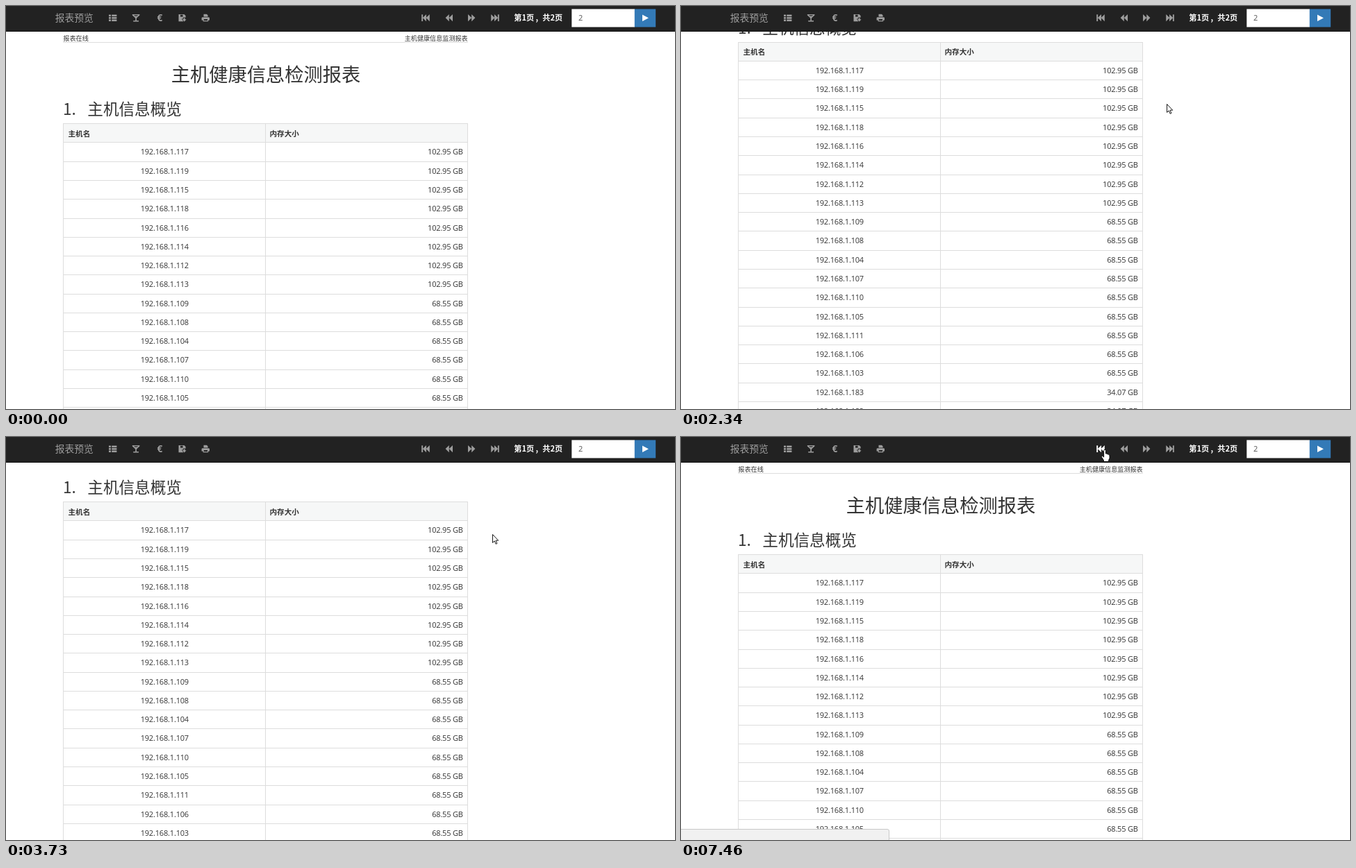
Write an HTML page that moves like this. It is 963x581 px and loops after 8 s.

```html
<!DOCTYPE html>
<html lang="zh-CN">
<head>
<meta charset="utf-8">
<title>报表预览</title>
<style>
html, body { margin: 0; width: 100%; height: 100%; overflow: hidden; background: #fff; }
svg { display: block; width: 963px; height: 581px; }
text { font-family: "Open Sans", "Noto Sans CJK SC", "Noto Sans CJK", sans-serif; fill: #333; }
.cjk { font-family: "Noto Sans CJK SC", "Noto Sans CJK", sans-serif; }
.cell { font-size: 11px; letter-spacing: -.18px; }
.icon { fill: #9d9d9d; }
.pages { font-weight: 700; fill: #fff; }
</style>
</head>
<body>
<svg id="stage" viewBox="0 0 963 581"></svg>
<script>
const stage = document.getElementById("stage");
const LOOP = 8000, TICK = 76, TOP = 169.6, PITCH = 27.28;

function add(parent, tag, attrs, content) {
  const el = document.createElementNS("http://www.w3.org/2000/svg", tag);
  for (const k in attrs) el.setAttribute(k, attrs[k]);
  if (content) el.textContent = content;
  return parent.appendChild(el);
}
const rect = (x, y, width, height, fill) => add(stage, "rect", { x, y, width, height, fill });
const path = (d, more) => add(stage, "path", { d, ...more });
const label = (parent, x, y, size, content, more) =>
  add(parent, "text", { x, y, "font-size": size, class: "cjk", ...more }, content);

// Report page
const hosts = [117, 119, 115, 118, 116, 114, 112, 113, 109, 108, 104, 107, 110, 105, 111, 106, 103, 183, 182, 181];
const memory = i => i < 8 ? "102.95 GB" : i < 17 ? "68.55 GB" : "34.07 GB";

const headFill = rect(82, 169, 583, 28, "#f6f7f7");
const rules = Array.from({ length: hosts.length + 2 }, () => rect(82, 0, 583, 1, "#ddd"));
const columns = [82, 373, 664].map(x => rect(x, 0, 1, 700, "#ddd"));
const headRule = rect(82, 52, 583, 1, "#ddd");
const page = add(stage, "g", {});
label(page, 82.3, 50, 9.15, "报表在线");
label(page, 664.7, 50, 9.1, "主机健康信息监测报表", { "text-anchor": "end" });
label(page, 374, 109, 27.25, "主机健康信息检测报表", { "text-anchor": "middle" });
label(page, 82, 157.3, 22.6, "1.");
label(page, 117.3, 157.3, 22.6, "主机信息概览");
label(page, 89.5, 187.5, 10.6, "主机名", { "font-weight": 700 });
label(page, 379.5, 187.5, 10.6, "内存大小", { "font-weight": 700 });
hosts.forEach((n, i) => {
  const y = 214.4 + PITCH * i;
  add(page, "text", { x: 228.3, y, class: "cell", "text-anchor": "middle" }, "192.168.1." + n);
  add(page, "text", { x: 657.8, y, class: "cell", "text-anchor": "end" }, memory(i));
});

// Toolbar
rect(0, 0, 963, 36, "#222");
rect(0, 36, 963, 1, "#101010");
label(stage, 70.8, 22.2, 13.75, "报表预览", { style: "fill:#9d9d9d" });

const icon = d => path(d, { class: "icon", "fill-rule": "evenodd" });
icon([12.5, 16, 19.5].map(y => `M148 ${y}h3v2.6h-3zM152.2 ${y}h7.2v2.6h-7.2z`).join(""));
icon("M181.8 12H192.4V13.3L187.9 17.6V21H191V22.4H183.2V21H186.3V17.6L181.8 13.3ZM184.2 13.3L185.4 14.6H188.8L190 13.3Z");
add(stage, "text", { x: 221.4, y: 21.9, "font-size": 13.5, "font-weight": 700, "text-anchor": "middle", style: "fill:#9d9d9d" }, "€");
icon("M248.5 12H256.5L258.6 14V16.6H254.8V18.6H252.8L255.4 22.2H248.5ZM251 12.8V15.4H254.6V12.8Z");
icon("M255.6 17.6H257.8V19.2H259.6L256.7 22.6L253.8 19.2H255.6Z");
icon("M284.5 11.8H289L290.6 13.4V15.6H284.5ZM282.4 16.2H292.2L293 17V20.6H291.2V22.2H283.6V20.6H281.6V17ZM284.8 19V21H290V19Z");

const back = x => `M${x + 5.2} 12V22.2L${x} 17.1Z`;
const forward = x => `M${x} 12V22.2L${x + 5.2} 17.1Z`;
const links = [
  { x: 604, el: icon("M598.2 12.2h1.9v9.8h-1.9z" + back(599.8) + back(604.6)) },
  { x: 638, el: icon(back(632.6) + back(637.8)) },
  { x: 670, el: icon(forward(665) + forward(670.2)) },
  { x: 704, el: icon(forward(698.2) + forward(703) + "M707.9 12.2h1.9v9.8h-1.9z") }
];
[[731.3, "第1页"], [762.5, ","], [772.3, "共2页"]].forEach(([x, s]) =>
  label(stage, x, 21.3, 11.1, s, { class: "cjk pages" }));
rect(814.3, 4.4, 90.7, 26, "#fff");
add(stage, "text", { x: 824, y: 21.2, "font-size": 11, style: "fill:#555" }, "2");
const button = rect(904.8, 4.4, 30.4, 26, "#337ab7");
path("M916 12.4V22L925 17.2Z", { fill: "#fff" });

const status = path("M-1 565.5H297Q299.5 565.5 299.5 568V582H-1Z", { fill: "#f1f1f1", stroke: "#c8c8c8" });

// Pointers, drawn around their hot spot
const outline = { fill: "#fff", stroke: "#000", "stroke-width": .9, "stroke-linejoin": "round" };
const arrow = path("M.5 .5V12.4L3.2 9.9L5.1 14.3L6.9 13.5L5 9.2H8.7Z", outline);
const hand = path("M-1.4 1.4Q-1.4 .3 0 .3Q1.4 .3 1.4 1.4V6Q3.8 5.4 4 7Q5.4 6.4 5.8 7.6Q7 7.4 7 9V12.5L5.6 15.4V17.5H-1.5V15.6L-4.7 10.8Q-5 8.9 -3.3 9.3L-1.4 11Z", outline);

const bursts = [[0, 1], [550, 5], [1010, 5], [1560, 4], [2340, 3], [2650, 4], [3560, 3],
  [4210, 11], [5190, 11], [6060, 5], [6610, 1], [6860, 5], [7380, 2]];
function snap(t) {
  const [start, count] = bursts.findLast(b => b[0] <= t);
  return start + TICK * Math.min(count - 1, Math.floor((t - start) / TICK + .1));
}

// Wheel turns: begin, end, distance
const NOTCH = 76;
const turns = [[1490, 1791, 2], [2270, 2492, -1], [2580, 2878, -1], [3490, 3712, 1], [4140, 4499, -1]];
const easeOut = p => 1 - (1 - Math.min(1, Math.max(0, p))) ** 1.6;
const scrollAt = t => turns.reduce((sum, [a, b, n]) => sum + n * NOTCH * easeOut((t - a) / (b - a)), 0);

// Pointer strokes: time, x, y; hidden between strokes
const strokes = [
  [[550, 861, 489], [780, 781, 165], [854, 799, 123], [1010, 797, 124], [1314, 699, 147],
   [1560, 699, 145], [2340, 699, 141], [2650, 700, 140], [4440, 700, 140], [4740, 895, 34],
   [4820, 916, 19], [4970, 884, 44], [5190, 872, 46], [5650, 662, 38], [5874, 632, 22],
   [5950, 633, 22], [6060, 657, 43], [6290, 585, 27], [6364, 601, 20]],
  [[6860, 633, 33], [7088, 603, 33]],
  [[7380, 605, 18], [7456, 610, 18]]
];
function pointerAt(t) {
  const stroke = strokes.find(s => t >= s[0][0] && t <= s.at(-1)[0]);
  if (!stroke) return null;
  const i = Math.max(1, stroke.findIndex(k => k[0] >= t));
  const [a, b] = [stroke[i - 1], stroke[i]];
  const p = (t - a[0]) / (b[0] - a[0]);
  return [1, 2].map(j => Math.round(a[j] + (b[j] - a[j]) * p));
}

const show = (el, on) => el.setAttribute("visibility", on ? "visible" : "hidden");

function draw(time) {
  const t = snap(time);
  const s = scrollAt(t);
  page.setAttribute("transform", `translate(0 ${-s})`);
  const lineY = k => Math.floor(TOP + PITCH * k - s);
  rules.forEach((el, k) => el.setAttribute("y", lineY(k)));
  columns.forEach(el => el.setAttribute("y", lineY(0)));
  headFill.setAttribute("y", lineY(0));
  headRule.setAttribute("y", Math.round(52 - s));

  const p = pointerAt(t);
  const inBar = p && p[1] < 37;
  const loading = t >= 6360; // the first link stays lit
  const active = loading ? links[0] : inBar && links.find(l => Math.abs(p[0] - l.x) < 16);
  const onButton = inBar && p[0] >= 905 && p[0] < 936 && p[1] < 31;
  links.forEach(l => l.el.style.fill = l === active ? "#fff" : "#9d9d9d");
  button.setAttribute("fill", onButton ? "#286090" : "#337ab7");
  show(status, t >= 5950);

  const linked = Boolean(active || onButton);
  show(arrow, p && !linked);
  show(hand, p && linked);
  if (p) (linked ? hand : arrow).setAttribute("transform", `translate(${p[0]} ${p[1]})`);
}

const begin = performance.now();
function tick(now) {
  draw(Math.max(0, now - begin) % LOOP);
  requestAnimationFrame(tick);
}
draw(0);
requestAnimationFrame(tick);
</script>
</body>
</html>
```
